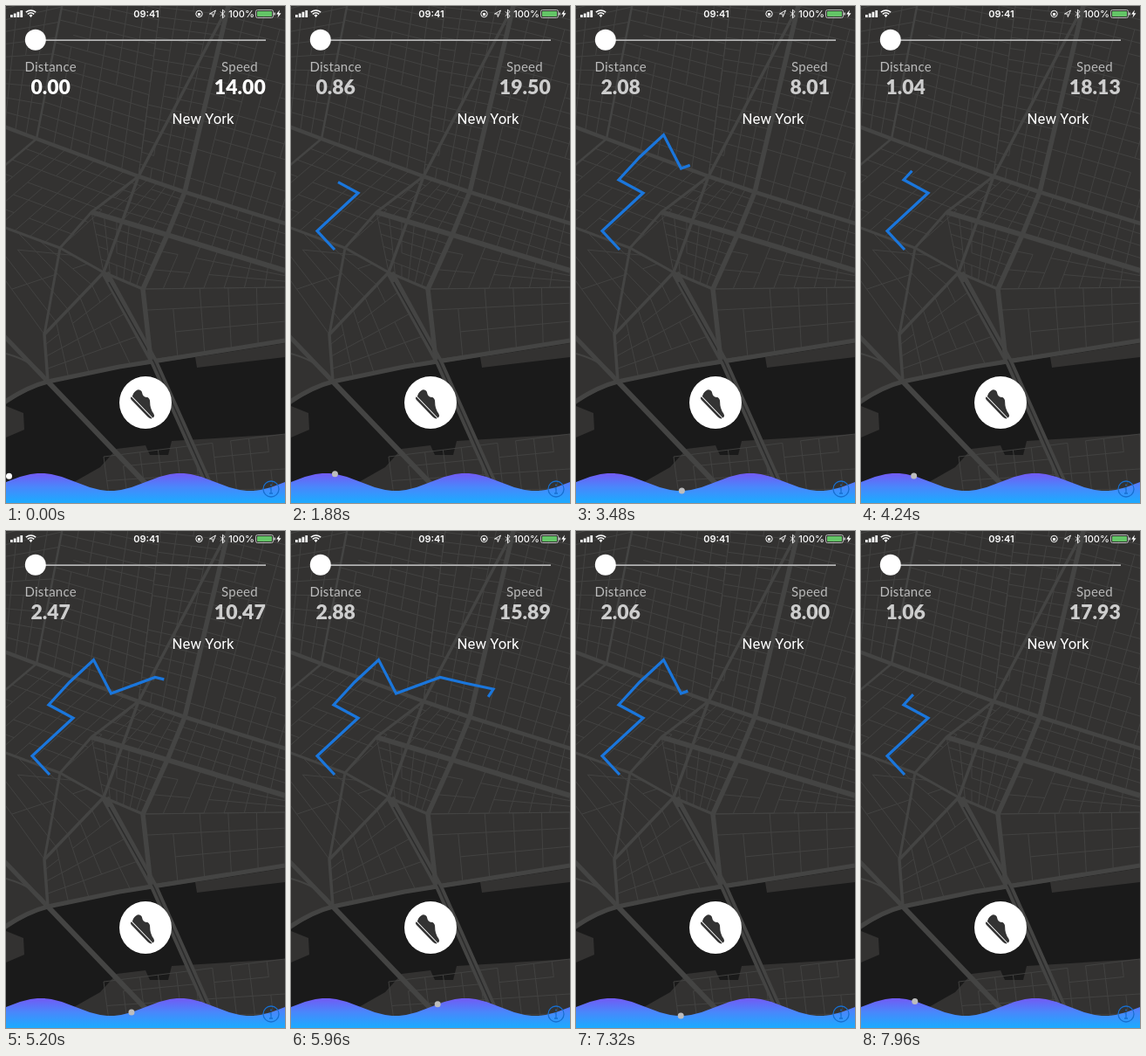
These frames come from a looping animation (320 px wide and 569 px high, 8 s). An HTML page:

```html
<!DOCTYPE html>
<html lang="en">
<head>
<meta charset="utf-8">
<title>Run tracker</title>
<style>
html, body { margin: 0; width: 100%; height: 100%; overflow: hidden; background: #333231; }
svg { display: block; width: 100vw; height: 100vh; }
text { fill: #fff; text-anchor: middle; }
.status { font: 500 11px Inter, Roboto, sans-serif; }
.label { font: 400 15px Lato, sans-serif; letter-spacing: .25px; fill: #bababa; }
.value { font: 900 23px Lato, sans-serif; }
.moving .value { fill: #cdcdcd; }
.city { font: 400 16.8px Roboto, sans-serif; }
.road { fill: none; stroke: #444443; stroke-linejoin: round; }
</style>
</head>
<body>
<svg id="stage" viewBox="0 0 320 569" preserveAspectRatio="none">
  <defs>
    <linearGradient id="sea" gradientUnits="userSpaceOnUse" x1="0" y1="534" x2="0" y2="567">
      <stop offset="0" stop-color="#7557f4"/>
      <stop offset=".5" stop-color="#4a86fb"/>
      <stop offset="1" stop-color="#1fa8ff"/>
    </linearGradient>
  </defs>
  <rect width="320" height="569" fill="#333231"/>
  <g id="streets" class="road" stroke-width=".9"></g>
  <path fill="#1a1a1a" d="M0 456Q24 438 48 432L130 415 320 386V490L190 498 186 514H165L160 503 127 507 108 528 78 545V569H0Z"/>
  <path fill="#333231" d="M217 402L320 386V402L219 414ZM0 458L20 466 21 485 0 494Z"/>
  <g id="docks" class="road" stroke-width=".9"></g>
  <g id="roads" class="road">
    <path stroke-width="5" d="M-4 455Q24 436 48 430L130 413 320 383M-4 376L48 430"/>
    <path stroke-width="2" d="M0 398Q36 408 48 430"/>
    <path stroke-width="6" d="M48 430L170 557"/>
    <path stroke-width="9" d="M114 306L170 408 240 565"/>
    <path stroke-width="1.5" stroke="#2b2b2b" d="M118 316L170 408 240 565"/>
  </g>
  <polyline id="route" fill="none" stroke="#1a76dc" stroke-width="3.2"
    points="50,279 30,257.5 77,214 49,199 73,173 100.5,147.5 120.5,186 171,167.5 199,174 232,181 200,230"/>

  <g fill="#fff">
    <path d="M5 10h2.7v3H5zM8.8 8.4h2.7V13H8.8zM12.6 6.7h2.7V13h-2.7zM16.4 5h2.7v8h-2.7z"/>
    <path d="M28.500 13l-2-2.300q2-1.700 4 0z"/>
    <path fill="none" stroke="#fff" stroke-width="1.5" d="M24.800 9.300q3.700-3 7.400 0M22.800 7.200q5.700-4.600 11.400 0"/>
    <text class="status" x="161" y="13" style="font-weight:600">09:41</text>
    <g fill="none" stroke="#fff">
      <circle cx="221.5" cy="9" r="3.7"/>
      <path stroke-width=".9" d="M233.500 9l7-4-3.200 7.500-.5-3.500zM246 6.500l5 5-2.500 2.300V4.200L251 6.500l-5 5"/>
      <rect x="286.500" y="4.500" width="20" height="9" rx="2" stroke="#bbb"/>
    </g>
    <rect x="220" y="8" width="3" height="3"/>
    <text class="status" x="270" y="13">100%</text>
    <rect x="288" y="6" width="17" height="6" rx=".8" fill="#63c466"/>
    <path d="M307.500 7.500h1.200v3h-1.200zM314 4.500l-4 5h2.500l-1 4 4-5.200H313z"/>
    <rect x="34" y="38.300" width="264" height="1.700" fill="#b5b5b5"/>
    <circle cx="33.800" cy="38.700" r="12"/>
  </g>
  <text class="label" x="51.200" y="74.500">Distance</text>
  <text class="label" x="268" y="74.500">Speed</text>
  <text class="value" id="distance" x="51.200" y="101"></text>
  <text class="value" id="speed" x="268.300" y="101"></text>
  <text class="city" x="226" y="135">New York</text>

  <circle cx="160" cy="454" r="30" fill="#fff"/>
  <g transform="translate(159.500 455) rotate(46)" fill="#333">
    <path d="M-17-5Q-14-8-11-6-7-3-3-7 0-8 3-5 8 0 15 1 19 2 18 5H-16Q-19 0-17-5Z"/>
    <path d="M-16.500 6H18Q17 8.500 13 8.500H-14Q-16.500 8.500-16.500 6Z"/>
  </g>

  <path id="wave" fill="url(#sea)"/>
  <g fill="none" stroke="#176fd0" stroke-width="1.3">
    <circle cx="304" cy="553" r="9"/>
    <path d="M304 547.500v2M302.500 552h1.500v6M302 558h4"/>
  </g>
  <circle id="dot" r="3.5"/>
</svg>
<script>
const $ = id => document.getElementById(id);
const LOOP = 8000, STEP = 40, START = 1120;
const RATE = 2.29;                         // wave phase per unit of distance
const FREQ = 2 * Math.PI / 160;            // two waves across the stage
const waveY = x => 545 - 10 * Math.sin(FREQ * x);

// Junctions; roads join them and street blocks fill the space between
const NODES = {
  l: [-60, 10], m: [70, -30], n: [178, -8], o: [255, 0], p: [400, 35],
  h: [-50, 120], a: [35, 152], b: [152, 195], c: [205, 213], d: [330, 252],
  k: [-60, 232], v: [62, 277], e: [98, 236], f: [185, 262], g: [320, 303],
  i: [112, 305], j: [157, 324], t: [320, 322], w: [44, 376],
  q: [48, 430], r: [166, 405], s: [320, 383],
  x: [112, 516], y: [320, 490], z: [330, 575], u: [120, 575],
};

let seed = 7;
const random = () => (seed = seed * 16807 % 2147483647) / 2147483647;

function add(parent, d, width) {
  const p = document.createElementNS('http://www.w3.org/2000/svg', 'path');
  p.setAttribute('d', d);
  if (width) p.setAttribute('stroke-width', width);
  $(parent).append(p);
}

function road(names, width) {
  add('roads', 'M' + [...names].map(n => NODES[n].join(' ')).join('L'), width);
}

// A grid between four junctions, with a few street pieces left out
function blocks(parent, names, cols, rows) {
  const [A, B, C, D] = [...names].map(n => NODES[n]);
  const mix = (a, b, u) => a + (b - a) * u;
  const at = (col, row) => {
    const u = col / cols, v = (row / rows) ** 1.1;
    return [0, 1].map(k => mix(mix(A[k], B[k], u), mix(D[k], C[k], u), v).toFixed(1)).join(' ');
  };
  let d = '';
  for (let i = 0; i <= cols; i++) {
    for (let j = 0; j <= rows; j++) {
      if (i < cols && random() < .9) d += `M${at(i, j)}L${at(i + 1, j)}`;
      if (j < rows && random() < .93) d += `M${at(i, j)}L${at(i, j + 1)}`;
    }
  }
  add(parent, d);
}

blocks('streets', 'opdc', 7, 14);
blocks('streets', 'nocb', 4, 16);
blocks('streets', 'mnba', 6, 14);
blocks('streets', 'lmah', 7, 10);
blocks('streets', 'abvk', 7, 6);
blocks('streets', 'bcfe', 5, 5);
blocks('streets', 'cdgf', 8, 4);
blocks('streets', 'efji', 6, 5);
blocks('streets', 'kviw', 5, 3);
blocks('streets', 'fgtj', 7, 3);
blocks('streets', 'jtsr', 5, 3);
blocks('streets', 'wirq', 5, 4);
blocks('docks', 'xyzu', 10, 4);

road('habcd', 4.5);
road('efg', 6);
road('ocfjr', 5.5);
road('obi', 3.5);
road('bevw', 3);
road('kvij', 3);
road('iwq', 3.5);
road('mak', 2.5);

let outline = 'M0 569';
for (let x = 0; x <= 320; x += 4) outline += `L${x} ${waveY(x).toFixed(2)}`;
$('wave').setAttribute('d', outline + 'V569Z');

// The finger eases back and forth between two ends
const LOW = .95, HIGH = 2.884;
const STOPS = [[1189, 0], [3062, HIGH], [4000, LOW], [5731, HIGH], [6587, HIGH], [8208, LOW]];

function travelled(t) {
  const next = STOPS.findIndex(stop => t < stop[0]);
  if (next === 0) return 0;
  const [t0, d0] = STOPS[next - 1], [t1, d1] = STOPS[next];
  return d0 + (d1 - d0) * (1 - Math.cos(Math.PI * (t - t0) / (t1 - t0))) / 2;
}

function draw(time) {
  const t = Math.floor(time / STEP) * STEP;
  const moving = t >= START;
  const dist = travelled(t);
  const swing = Math.sin(RATE * dist);
  const x = dist * RATE / FREQ;
  $('stage').classList.toggle('moving', moving);
  $('dot').setAttribute('cx', moving ? x : 3.5);
  $('dot').setAttribute('cy', moving ? waveY(x) : 538.3);
  $('dot').setAttribute('fill', moving ? '#bdbdbd' : '#fff');
  $('route').style.strokeDasharray = `${126.5 * dist + 11 * swing} 999`;
  $('route').style.visibility = dist ? 'visible' : 'hidden';
  $('distance').textContent = dist.toFixed(2);
  $('speed').textContent = (14 + 6 * swing).toFixed(2);
}

const begin = performance.now();
function tick() {
  draw((performance.now() - begin) % LOOP);
  requestAnimationFrame(tick);
}
tick();
</script>
</body>
</html>
```
